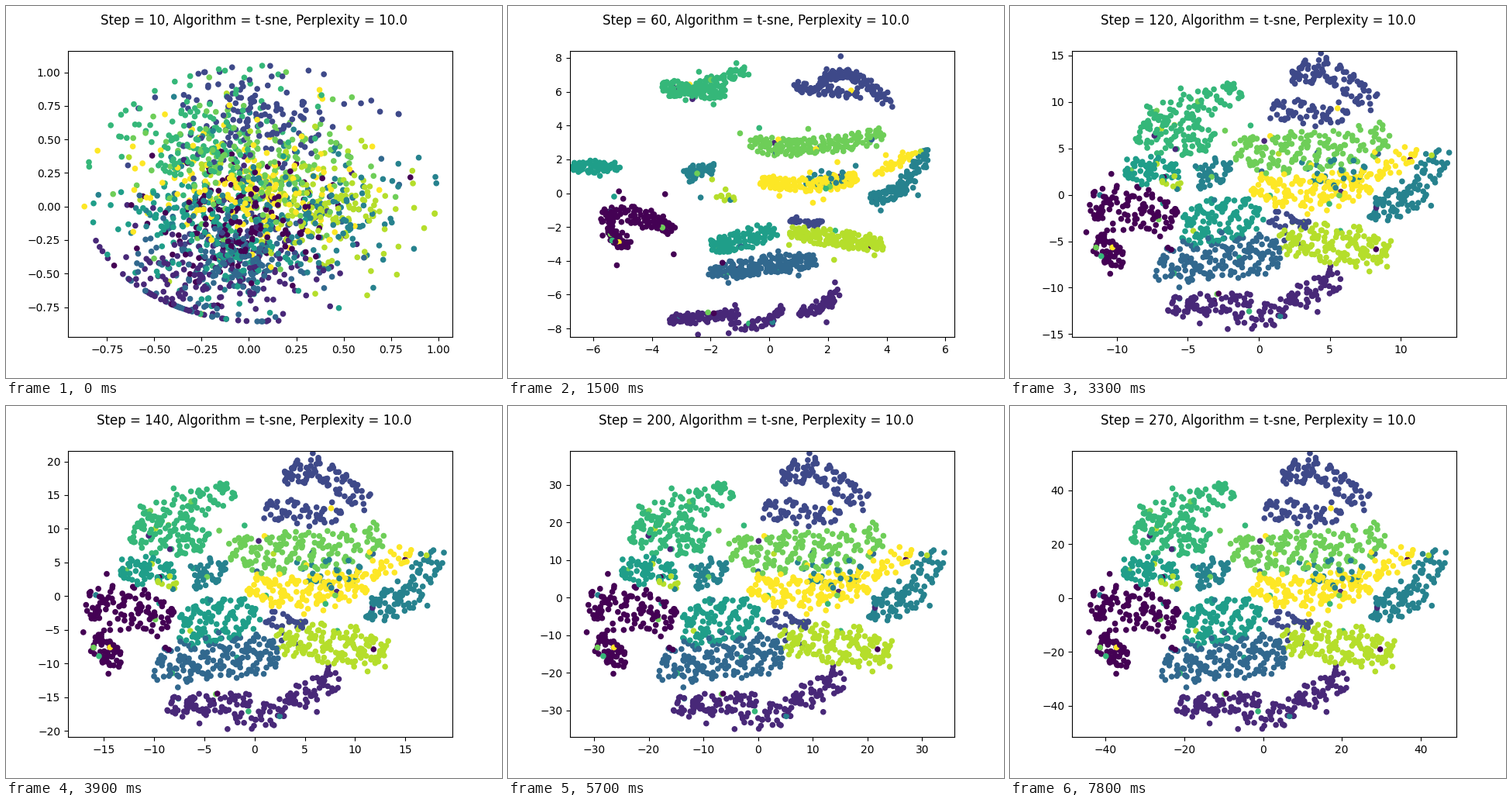
A matplotlib script that plays this animation: 640 by 480 pixels, repeating every 8 s.

```python
import numpy as np
import matplotlib.pyplot as plt
from matplotlib.animation import FuncAnimation

W, H = 640, 480
LEFT, BOTTOM, AX_W, AX_H = 80, 52.8, 496, 369.6
TICK_MS, TICKS_PER_STEP, TICKS = 100, 3, 80
rng = np.random.default_rng(7)


def spread(n, aspect):
    """Fairly even random points in the square [-1, 1]."""
    points = rng.uniform(-1, 1, (n, 2))
    for i in range(1, n):
        tries = rng.uniform(-1, 1, (4, 2))
        gaps = (tries[:, None] - points[:i]) * (aspect, 1)
        points[i] = tries[np.argmax((gaps ** 2).sum(2).min(1))]
    return points


def strip(spine, u, v):
    """Points along a quadratic curve (u) and across it (v), as x + yj."""
    a, b, c = spine
    t = (u + 1) / 2
    tangent = (1 - t) * (b - a) + t * (c - b)
    across = 1j * tangent / abs(tangent) * v * np.sqrt(1 - 0.6 * u ** 2)
    return (1 - t) ** 2 * a + 2 * t * (1 - t) * b + t ** 2 * c + across


compact, expanded, labels = [], [], []


def group(label, n, a, b, c, half, shift):
    """A curved cluster; its compact form is shorter, thinner and shifted."""
    u, v = spread(n, abs(c - a) / 2 / half).T
    middle = (a + 2 * b + c) / 4
    compact.append(middle + shift + strip(0.85 * (np.array([a, b, c]) - middle), u, 0.42 * half * v))
    expanded.append(strip((a, b, c), u, half * v))
    labels.extend([label] * n)


group(0, 110, 104+258j, 160+252j, 212+280j, 27, 8+12j)
group(0, 68, 122+290j, 126+330j, 152+322j, 14, 8-15j)
group(1, 80, 218+388j, 262+384j, 320+378j, 13, -15+18j)
group(1, 45, 300+402j, 360+410j, 375+374j, 13, -18+10j)
group(1, 57, 370+376j, 415+374j, 425+345j, 15, 0+20j)
group(2, 95, 352+98j, 388+55j, 460+132j, 15, 45+5j)
group(2, 55, 328+130j, 365+138j, 425+142j, 14, 35-28j)
group(2, 27, 342+274j, 360+282j, 390+280j, 10, 20+0j)
group(3, 183, 198+334j, 280+326j, 354+316j, 27, 52+10j)
group(4, 110, 468+262j, 518+266j, 550+188j, 20, -5-12j)
group(4, 45, 240+222j, 258+215j, 282+208j, 16, -12-2j)
group(4, 26, 385+220j, 425+210j, 455+212j, 18, -5+8j)
group(5, 65, 143+212j, 175+212j, 215+212j, 16, -66-5j)
group(5, 117, 228+285j, 265+282j, 322+262j, 28, 28+25j)
group(6, 96, 160+160j, 200+172j, 255+172j, 22, 32-60j)
group(6, 85, 168+142j, 230+132j, 286+108j, 17, 30-28j)
group(7, 179, 285+182j, 370+205j, 484+168j, 26, 15-8j)
group(8, 163, 355+298j, 430+310j, 495+318j, 24, -2-8j)
group(8, 11, 197+228j, 208+228j, 222+231j, 4, 72+18j)
group(9, 150, 316+232j, 390+250j, 462+225j, 21, 0-8j)
group(9, 30, 460+218j, 490+208j, 518+188j, 12, 10-2j)

compact, expanded = np.concatenate(compact), np.concatenate(expanded)
labels = np.array(labels)
count = len(labels)


def noise(sx, sy, n=count):
    return rng.normal(0, sx, n) + 1j * rng.normal(0, sy, n)


# First clouds: one loose, long-tailed cloud per class inside an oval
CENTRES = np.array([305+280j, 265+345j, 325+165j, 278+342j, 370+265j,
                    270+300j, 258+178j, 325+205j, 405+255j, 310+235j])
means = np.array([expanded[labels == k].mean() for k in range(10)])
early = CENTRES[labels] + 0.7 * (expanded - means[labels])
early += noise(48, 34) * rng.uniform(0.2, 1.8, count)
away = early - (328 + 242j)
early = 328 + 242j + away / np.maximum(1, np.hypot(away.real / 228, away.imag / 165))

# Draw the expanded clusters into short chains
x, y = expanded.real, expanded.imag
expanded = expanded + 3.6 * np.sin(0.25 * x + 0.16 * y) + 3.6j * np.sin(0.25 * y - 0.18 * x + 1)
compact = compact + noise(1.6, 1.6)

# Some strays around the clusters, some points in the wrong cluster
strays = rng.choice(count, 100, replace=False)
jitter = noise(14, 14, 100)
compact[strays] += jitter
expanded[strays] += jitter
lost = rng.choice(count, 60, replace=False)
labels[lost] = labels[np.roll(lost, 1)]

order = rng.permutation(count)
early, compact, expanded, labels = (a[order] for a in (early, compact, expanded, labels))


def positions(step):
    if step <= 60:
        left = (60 - step) / 50
        return compact + (early - compact) * left ** 2
    grown = np.interp(step, [60, 100, 110, 120], [0, 0.12, 0.6, 1])
    # The whole map leans over a little while it settles
    lean = 0.08 * np.exp(-max(step - 120, 0) / 45) * (expanded.imag - 245)
    return compact + (expanded - lean - compact) * grown


def limits(step):
    """Axis limits from the data width, the aspect and the pixel of the origin."""
    width = np.interp(step, [10, 30, 60, 100, 110, 120, 160, 200, 230, 270],
                      [2.03, 8, 13.1, 14, 18.8, 27.06, 49.5, 70.3, 83, 97.7])
    stages = [10, 60, 120, 160, 270]
    height = width * np.interp(step, stages, [1.0517, 1.293, 1.14, 1.082, 1.088])
    x = np.interp(step, stages, [313.45, 337.1, 321.1, 320.5, 326.5])
    y = H - np.interp(step, stages, [258.72, 241.5, 243.63, 247, 247.6])
    x0, y0 = (LEFT - x) / AX_W * width, (BOTTOM - y) / AX_H * height
    return (x0, x0 + width), (y0, y0 + height)


def to_axes(z):
    return np.column_stack([(z.real - LEFT) / AX_W, (H - z.imag - BOTTOM) / AX_H])


fig = plt.figure(figsize=(W / 100, H / 100), dpi=100)
ax = fig.add_axes([LEFT / W, BOTTOM / H, AX_W / W, AX_H / H])
title = fig.suptitle("")
dots = ax.scatter(*to_axes(early).T, s=20, c=labels, cmap="viridis", transform=ax.transAxes)


def update(tick):
    step = 10 + 10 * (tick // TICKS_PER_STEP)
    xlim, ylim = limits(step)
    ax.set(xlim=xlim, ylim=ylim)
    dots.set_offsets(to_axes(positions(step)))
    title.set_text(f"Step = {step}, Algorithm = t-sne, Perplexity = 10.0")
    return dots, title


anim = FuncAnimation(fig, update, frames=TICKS, interval=TICK_MS,
                     repeat=True, repeat_delay=0, blit=False)
plt.show()
```
